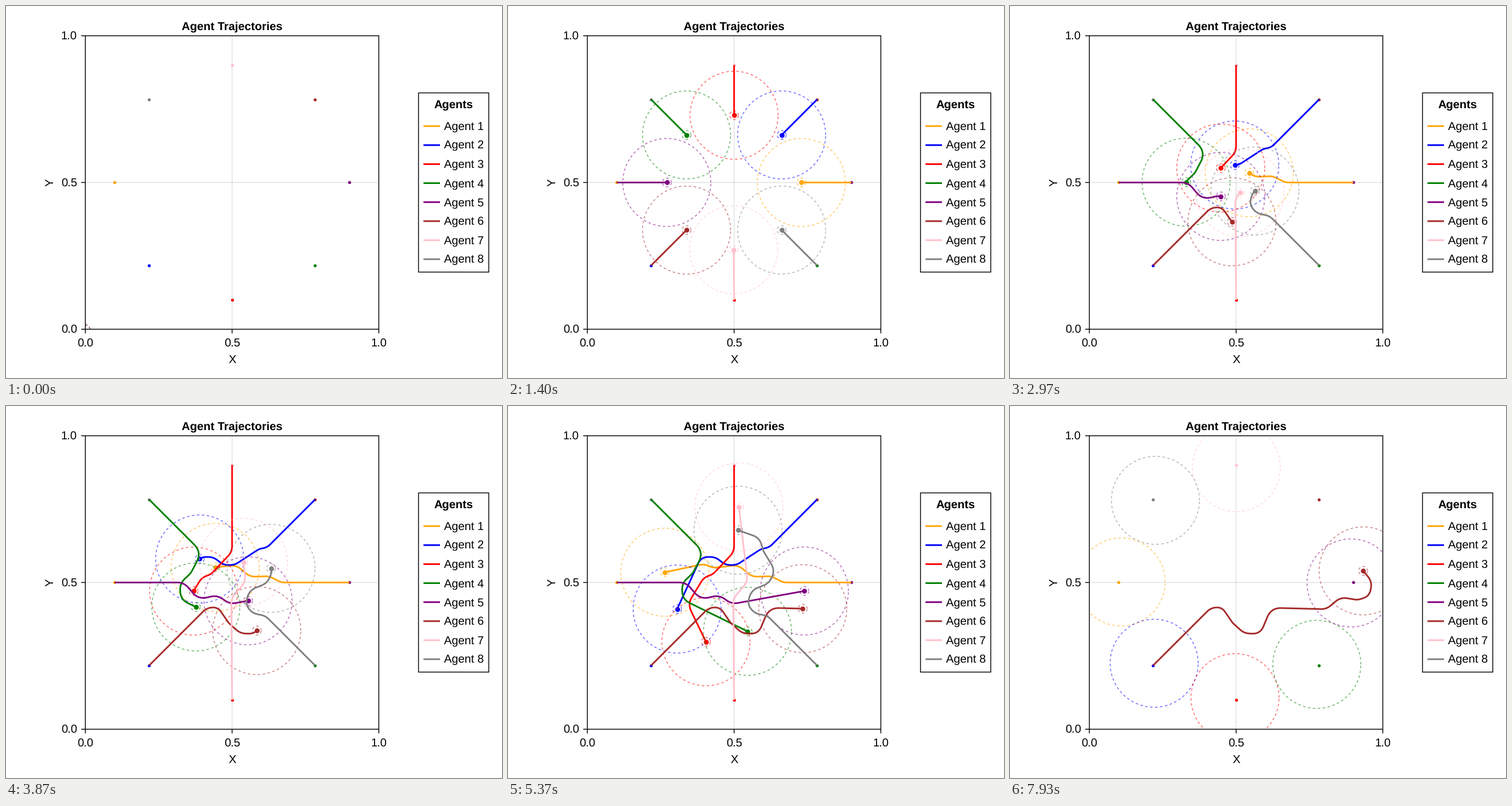
A matplotlib script for the animation above (8000 ms loop, 864 by 648 pixels).

```python
import numpy as np
import matplotlib.pyplot as plt
from matplotlib.animation import FuncAnimation
from matplotlib.patches import Rectangle

plt.rcParams.update({
    "font.family": "Liberation Sans",
    "text.hinting": "none",
    "path.simplify": False,
    "lines.solid_capstyle": "butt",
    "lines.solid_joinstyle": "round",
})

U = 1.44                                  # pixels per layout unit
FONT = 14 * U
LEFT, RIGHT, TOP, BOTTOM = 96 * U, 451 * U, 36 * U, 391 * U
SIDE = RIGHT - LEFT
CENTER = np.array([(LEFT + RIGHT) / 2, (TOP + BOTTOM) / 2])
STEP = SIDE * 0.1 / 24                    # free-run distance per frame
FREE = 42                                 # all agents run freely until here
TURN = 0.05 * SIDE                        # turning radius
REST = 0.0085 * SIDE                      # gap left before the goal
FRAMES, LAST = 240, 238
RING = np.linspace(0, 2 * np.pi, 181)

# dpi 72 makes one point equal one pixel
fig = plt.figure(figsize=(12, 9), dpi=72, facecolor="white")
ax = fig.add_axes([0, 0, 1, 1])
ax.set_xlim(0, 864)
ax.set_ylim(648, 0)
ax.axis("off")


def line(xs, ys, width=U, **kw):
    return ax.plot(xs, ys, lw=width, snap=False, **kw)[0]


def text(x, y, s, ha="center", **kw):
    kw.setdefault("va", "baseline")
    return ax.text(x, y, s, ha=ha, fontsize=FONT, color="black", **kw)


def frame_box(x0, y0, x1, y1):
    box = Rectangle((x0, y0), x1 - x0, y1 - y0, fill=False, ec="black",
                    lw=U, snap=False, zorder=5, joinstyle="miter")
    return ax.add_patch(box)


def round_off(pts):
    """Polyline through pts with every corner rounded to the turning radius."""
    seg = np.diff(pts, axis=0)
    size = np.hypot(*seg.T)
    unit = seg / size[:, None]
    t = np.linspace(0, 1, 13)[:, None]
    out = [pts[:1]]
    for p, u, v, m, n in zip(pts[1:-1], unit, unit[1:], size, size[1:]):
        angle = np.arccos(np.clip(u @ v, -1, 1))
        cut = min(TURN * np.tan(angle / 2), m / 2, n / 2)
        out.append(p - cut * u * (1 - t)**2 + cut * v * t**2)
    out.append(pts[-1:])
    return np.vstack(out)


def ring(part, c, r):
    part.set_data(c[0] + r * SIDE * np.cos(RING), c[1] - r * SIDE * np.sin(RING))


class Agent:
    """Crosses the circle from its start to the opposite side."""

    def __init__(self, index, color, arrival, *corners):
        a = index * np.pi / 4
        arm = 0.4 * SIDE * np.array([np.cos(a), -np.sin(a)])
        self.goal = CENTER - arm
        self.color, self.arrival = color, arrival
        self.curve = round_off(np.array([CENTER + arm, *corners, self.goal]))
        steps = np.hypot(*np.diff(self.curve, axis=0).T)
        self.s = np.append(0, np.cumsum(steps))

    def travelled(self, f):
        return np.interp(f, [1, FREE, self.arrival],
                         [0, (FREE - 1) * STEP, self.s[-1] - REST])

    def build(self, clip):
        c = self.color
        dash = dict(color=c, ls=(0, (3, 3)), alpha=0.6)
        self.trail = line([], [], 2 * U, color=c)
        self.dot = line([], [], marker="o", ms=8.6, mew=0, color=c)
        self.near = line([], [], **dash)
        self.far = line([], [], **dash)
        for part in (self.trail, self.dot, self.near, self.far):
            part.set_clip_path(clip)

    def draw(self, f):
        d = self.travelled(f)
        p = np.array([np.interp(d, self.s, c) for c in self.curve.T])
        ring(self.far, p, 0.15)
        ring(self.near, p if f else (LEFT, BOTTOM), 0.015)
        self.trail.set_data(*np.vstack([self.curve[self.s < d], p]).T)
        self.dot.set_data([p[0]], [p[1]])
        moving = 0 < f < self.arrival
        self.trail.set_visible(moving)
        self.dot.set_visible(moving)
        self.near.set_visible(f < self.arrival)
        self.far.set_visible(f > 0)


# arrival frame, then the corners where an agent swerves around the others
agents = [
    Agent(0, "orange", 200, (480, 307.4), (458, 296.5), (425, 297.5),
          (401, 277), (357, 282), (342, 275)),
    Agent(1, "blue", 209, (455, 246.3), (441, 249), (398, 277), (379, 277),
          (361, 263), (336.5, 263)),
    Agent(2, "red", 211, (393.8, 254), (357, 293), (341, 299), (313, 345)),
    Agent(3, "green", 222, (341, 254.6), (322, 291), (303, 309), (304, 337)),
    Agent(4, "purple", 198, (310, 307.4), (335, 337), (368, 329.5),
          (390, 345)),
    Agent(5, "brown", 302, (350, 351.4), (369, 350.5), (388, 378), (408, 396),
          (436, 397), (455, 351.5), (551, 354), (576, 333), (606, 338),
          (626, 331), (631, 306), (609, 280)),
    Agent(6, "pink", 193, (392.5, 335), (417.5, 306)),
    Agent(7, "gray", 234, (452, 365.6), (429, 361), (417, 345), (424, 321),
          (455, 308.5), (465, 286), (445, 253), (438, 229.5)),
]

# plot area
grid = dict(color="black", alpha=0.12, zorder=0)
line([CENTER[0]] * 2, [TOP, BOTTOM], **grid)
line([LEFT, RIGHT], [CENTER[1]] * 2, **grid)
plot_box = frame_box(LEFT, TOP, RIGHT, BOTTOM)
for v in (0, 0.5, 1):
    x, y = LEFT + v * SIDE, BOTTOM - v * SIDE
    line([x, x], [BOTTOM, BOTTOM + 5 * U], color="black")
    line([LEFT - 5 * U, LEFT], [y, y], color="black")
    text(x, 594, f"{v:.1f}")
    text(123.8, y + 7.2, f"{v:.1f}", ha="right")
text(CENTER[0], 41.6, "Agent Trajectories", weight="bold")
text(CENTER[0], 621.7, "X")
text(77.8, CENTER[1], "Y", va="center", rotation=90)

# legend
frame_box(499 * U, 151.4, 584 * U, 463.5)
text(779.8, 178.7, "Agents", weight="bold")
for i, agent in enumerate(agents):
    y = 209.2 + 23 * U * i
    line([505 * U, 525 * U], [y, y], 2 * U, color=agent.color)
    text(530 * U, y + 7, f"Agent {i + 1}", ha="left")

for agent in agents:
    line(*agent.goal[:, None], marker="o", ms=5.3, mew=0, color=agent.color)
for agent in agents:
    agent.build(plot_box)


def update(i):
    for agent in agents:
        agent.draw(min(i, LAST))
    return []


def reset():
    return update(0)


anim = FuncAnimation(fig, update, frames=FRAMES, init_func=reset,
                     interval=8000 / FRAMES, repeat=True, repeat_delay=0,
                     blit=False)
plt.show()
```
